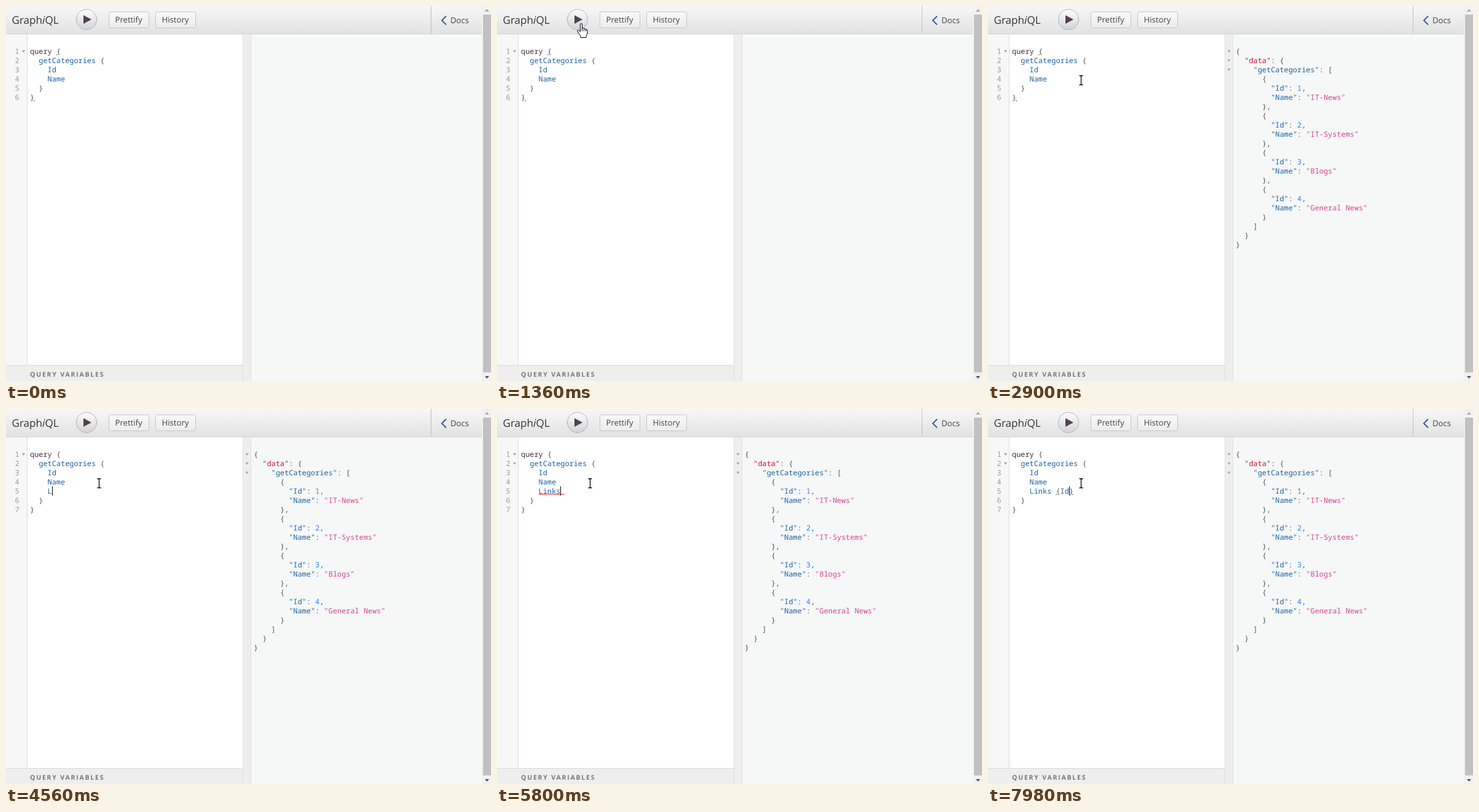
Write an HTML page that moves like this. It is 789 by 611 pixels and loops after 8000 ms.

```html
<!DOCTYPE html>
<html lang="en">
<head>
<meta charset="utf-8">
<title>GraphiQL</title>
<style>
  html, body { margin: 0; width: 100%; height: 100%; overflow: hidden; background: #fff; }
  svg { display: block; width: 789px; height: 611px; }
  text { white-space: pre; text-rendering: geometricPrecision; }
  .ui { font-family: "Open Sans", "Noto Sans", sans-serif; fill: #444; font-size: 13.2px; }
  .code { font-family: "Noto Sans Mono", "DejaVu Sans Mono", monospace; font-size: 11.91px; }
  .key { fill: #1f61a0; }
  .word { fill: #40303a; }
  .punc { fill: #555; }
  .def { fill: #c8102e; }
  .num { fill: #2882f9; }
  .str { fill: #d64292; }
  .line { fill: #999; }
  .fold { fill: #a4a4a4; }
  .popup { filter: drop-shadow(0 1px 1.5px rgba(0, 0, 0, .45)); }
</style>
</head>
<body>
<svg viewBox="0 0 789 611">
  <defs>
    <linearGradient id="bar" x2="0" y2="1"><stop stop-color="#f7f7f7"/><stop offset="1" stop-color="#e2e2e2"/></linearGradient>
    <linearGradient id="btn" x2="0" y2="1"><stop stop-color="#f9f9f9"/><stop offset="1" stop-color="#ececec"/></linearGradient>
    <linearGradient id="run" x2="0" y2="1"><stop stop-color="#fdfdfd"/><stop offset="1" stop-color="#d2d3d6"/></linearGradient>
  </defs>

  <!-- panes -->
  <rect width="789" height="611" fill="#fff"/>
  <rect y="46" width="34" height="540" fill="#f7f7f7"/>
  <rect x="34" y="46" width="1" height="540" fill="#ddd"/>
  <rect x="385" y="46" width="14" height="565" fill="#e0e0e0"/>
  <rect x="386" y="46" width="12" height="565" fill="#eee"/>
  <rect x="399" y="46" width="376" height="565" fill="#f6f8f8"/>
  <rect y="585" width="385" height="26" fill="#eee"/>
  <rect y="585" width="385" height="1" fill="#d9d9d9"/>
  <text class="ui" x="39" y="604" style="font-size:10.5px;font-weight:700;letter-spacing:1.8px;fill:#777">QUERY VARIABLES</text>

  <!-- top bar -->
  <rect width="775" height="45" fill="url(#bar)"/>
  <rect y="45" width="775" height="1" fill="#d0d0d0"/>
  <text class="ui" x="9.5" y="29" style="font-size:17.1px;fill:#333">Graph<tspan font-style="italic">i</tspan>QL</text>
  <circle cx="131" cy="22" r="16.5" fill="url(#run)" stroke="#b0b0b0"/>
  <path d="M126 15L139 22L126 29z" fill="#534247"/>
  <g fill="url(#btn)" stroke="#c6c6c6">
    <rect x="167.500" y="9.500" width="65" height="26" rx="2.500"/>
    <rect x="243.500" y="9.500" width="65" height="26" rx="2.500"/>
  </g>
  <text class="ui" x="177.500" y="27">Prettify</text>
  <text class="ui" x="253.500" y="27">History</text>
  <rect x="691" width="1" height="45" fill="#c0c0c0"/>
  <path d="M716 16.500L709 23.500L716 30.500" fill="none" stroke="#3b5998" stroke-width="2"/>
  <text class="ui" x="723" y="28">Docs</text>

  <!-- scrollbar -->
  <rect x="774" width="15" height="611" fill="#f1f1f1"/>
  <rect x="776" y="14" width="13" height="583" fill="#c1c1c1"/>
  <path d="M779 9L782.500 5L786 9z" fill="#a3a3a3"/>
  <path d="M779 603L782.500 607L786 603z" fill="#505050"/>

  <g id="editor" class="code"></g>
  <g id="result" class="code"></g>
  <g id="hints"></g>

  <rect id="caret" width="1" height="15" fill="#000"/>
  <g id="pointer">
    <path id="arrow" d="M.5 .5V17L4.300 13.400L6.800 19L9.200 18L6.700 12.400H11.800z" fill="#fff" stroke="#000"/>
    <path id="ibeam" d="M-3.500 -7.500H-1.500L-.5 -6.500L.5 -7.500H2.500M-3.500 7.500H-1.500L-.5 6.500L.5 7.500H2.500M-.5 -6.500V6.500" fill="none" stroke="#000" stroke-width="1.300"/>
    <path id="hand" d="M-1.500 13V1Q-1.500 -.5 0 -.5T1.500 1V7Q4 6 4.500 8Q7 7 7.500 9Q10 8.500 10 11V16L8 20V22.500H-1V20L-6 13Q-7 11 -5 10.500Q-3.500 10.500 -1.500 13zM1.500 7V12M4.500 8V12M7.500 9V12" fill="#fff" stroke="#000"/>
  </g>
</svg>
<script>
const LOOP = 8000, CHAR = 7.147, LEFT = 39;
const $ = id => document.getElementById(id);
const col = n => LEFT + n * CHAR;
const base = n => 63 + 15 * n;

const span = (cls, s) => `<tspan class="${cls}">${s}</tspan>`;
const row = (x, n, html) => `<text x="${x}" y="${base(n)}">${html}</text>`;
const on = (from, to, html) => `<g data-from="${from}" data-to="${to}">${html}</g>`;
const fold = (x, n) => `<path class="fold" d="M${x} ${57 + 15 * n}h5l-2.500 4z"/>`;
const lineNo = n => row(14.5, n, span('line', n));
const bit = (x, y) => `<rect x="${x}" y="${y}" width="2" height="1" fill="#555"/>`;
const brace = (c, n, s) => row(col(c), n, span('punc', s));

// Query editor
const zigzag = 'M68 140' + 'l1.500 -2l1.500 2'.repeat(14);
$('editor').innerHTML =
  [1, 2, 3, 4, 5, 6].map(lineNo).join('') + fold(26, 1) +
  row(LEFT, 1, span('word', 'query ') + span('punc', '{')) +
  row(col(2), 2, span('key', 'getCategories ') + span('punc', '{')) +
  row(col(4), 3, span('key', 'Id')) +
  row(col(4), 4, span('key', 'Name')) +
  on(0, 4240, brace(2, 5, '}') + brace(0, 6, '}')) +
  on(4240, LOOP, lineNo(7) + brace(2, 6, '}') + brace(0, 7, '}')) +
  on(0, 3380, bit(82, 79) + bit(45, 154)) +
  on(5800, LOOP, fold(26, 2)) +
  on(5800, 6900, `<path d="${zigzag}" fill="none" stroke="#e22" stroke-width=".9"/>`) +
  on(6350, LOOP, bit(110, 139)) +
  on(6350, 7440, bit(123, 139)) +
  on(7980, LOOP, bit(137, 139)) +
  `<text id="typed" x="${col(4)}" y="${base(5)}"></text>`;

// Response
const out = [];
const put = (indent, html) => out.push(row(403 + indent * CHAR, out.length + 1, html));
const punc = s => span('punc', s);
const field = (name, value, cls, end) =>
  put(8, span('key', `"${name}"`) + punc(': ') + span(cls, value) + punc(end));
put(0, punc('{'));
put(2, span('def', '"data"') + punc(': {'));
put(4, span('key', '"getCategories"') + punc(': ['));
['IT-News', 'IT-Systems', 'Blogs', 'General News'].forEach((name, i) => {
  put(6, punc('{'));
  field('Id', i + 1, 'num', ',');
  field('Name', `"${name}"`, 'str', '');
  put(6, punc(i < 3 ? '},' : '}'));
});
put(4, punc(']'));
put(2, punc('}'));
put(0, punc('}'));
$('result').innerHTML = on(1640, LOOP, out.join('')) +
  on(2220, LOOP, [1, 2, 3].map(n => fold(389.5, n)).join(''));

// Completion popups
function popup(x, items) {
  const h = items.length * 20;
  return `<g class="popup"><rect x="${x}" y="141" width="103" height="${h + 26}" fill="#fff"/></g>` +
    `<rect x="${x + 1}" y="142" width="101" height="19" fill="#08f"/>` +
    items.map((s, i) =>
      (i > 1 ? `<rect x="${x + 1}" y="${141 + i * 20}" width="101" height="1" fill="#f5f5f5"/>` : '') +
      `<text class="code" x="${x + 7}" y="${156 + i * 20}" fill="${i ? '#000' : '#fff'}">${s}</text>`).join('') +
    `<rect x="${x + 1}" y="${141 + h}" width="101" height="1" fill="#ccc"/>` +
    `<text class="ui" x="${x + 6.5}" y="${158 + h}" style="font-size:12.2px;fill:#222">Self descriptive.</text>`;
}
$('hints').innerHTML =
  on(4640, 4960, popup(67, ['Links', 'Name'])) +
  on(4960, 5570, popup(67, ['Links'])) +
  on(6500, 7440, popup(117, ['Id', 'Name', 'Url', 'Category']));

// Typing: time, name, rest of line, caret column
const typing = [
  [0, '', '', 4], [4560, 'L', '', 5], [4720, 'Li', '', 6], [4880, 'Lin', '', 7],
  [4960, 'Link', '', 8], [5110, 'Links', '', 9], [6260, 'Links', ' ', 10],
  [6350, 'Links', ' {}', 11], [7440, 'Links', ' {Id}', 13]
];
const tint = s => s.replace(/[{}]|\w+/g, m => span(/\w/.test(m) ? 'key' : 'punc', m));

// Caret visibility: from, to, column, line (null follows the typing)
const carets = [
  [1430, 1520, 1, 6], [3450, 3920, 8, 4], [4240, 6900, null, 5], [7440, LOOP, null, 5]
];

// Pointer hot spot: time, x, y
const path = [
  [130, 566, 574], [435, 393, 392], [740, 230, 222], [820, 209, 170], [900, 193, 128],
  [970, 179, 100], [1200, 142, 42], [1400, 135, 24], [1600, 134, 21], [2060, 134, 21],
  [2300, 136, 50], [2600, 147, 104], [2800, 151, 120], [2900, 152, 121]
];
function pointerAt(t) {
  const q = t > 2900 ? t : 130 + Math.floor((t - 130) / 76.2) * 76.2;
  const i = path.findIndex(p => p[0] > q);
  if (i < 0) return path[path.length - 1].slice(1);
  const a = path[i - 1], b = path[i], k = (q - a[0]) / (b[0] - a[0]);
  return [1, 2].map(j => Math.round(a[j] + (b[j] - a[j]) * k));
}
const shape = (x, y) =>
  Math.hypot(x - 131, y - 22) < 17 ? 'hand' : y > 46 && y < 160 && x < 385 ? 'ibeam' : 'arrow';

const show = (el, yes) => el.setAttribute('visibility', yes ? 'visible' : 'hidden');
const timed = [...document.querySelectorAll('[data-from]')];
let last = null;

function draw(t) {
  timed.forEach(el => show(el, t >= +el.dataset.from && t < +el.dataset.to));

  const state = typing.filter(s => s[0] <= t).pop();
  if (state !== last) {
    $('typed').innerHTML = tint(state[1] + state[2]);
    last = state;
  }

  const c = carets.find(c => t >= c[0] && t < c[1]);
  show($('caret'), c);
  if (c) {
    $('caret').setAttribute('x', Math.round(col(c[2] ?? state[3])));
    $('caret').setAttribute('y', 51 + 15 * c[3]);
  }

  const visible = t >= 130;
  const [x, y] = visible ? pointerAt(t) : [0, 0];
  $('pointer').setAttribute('transform', `translate(${x} ${y})`);
  for (const id of ['arrow', 'ibeam', 'hand']) show($(id), visible && shape(x, y) === id);
}

const start = performance.now();
function tick() {
  draw((performance.now() - start) % LOOP);
  requestAnimationFrame(tick);
}
tick();
</script>
</body>
</html>
```
